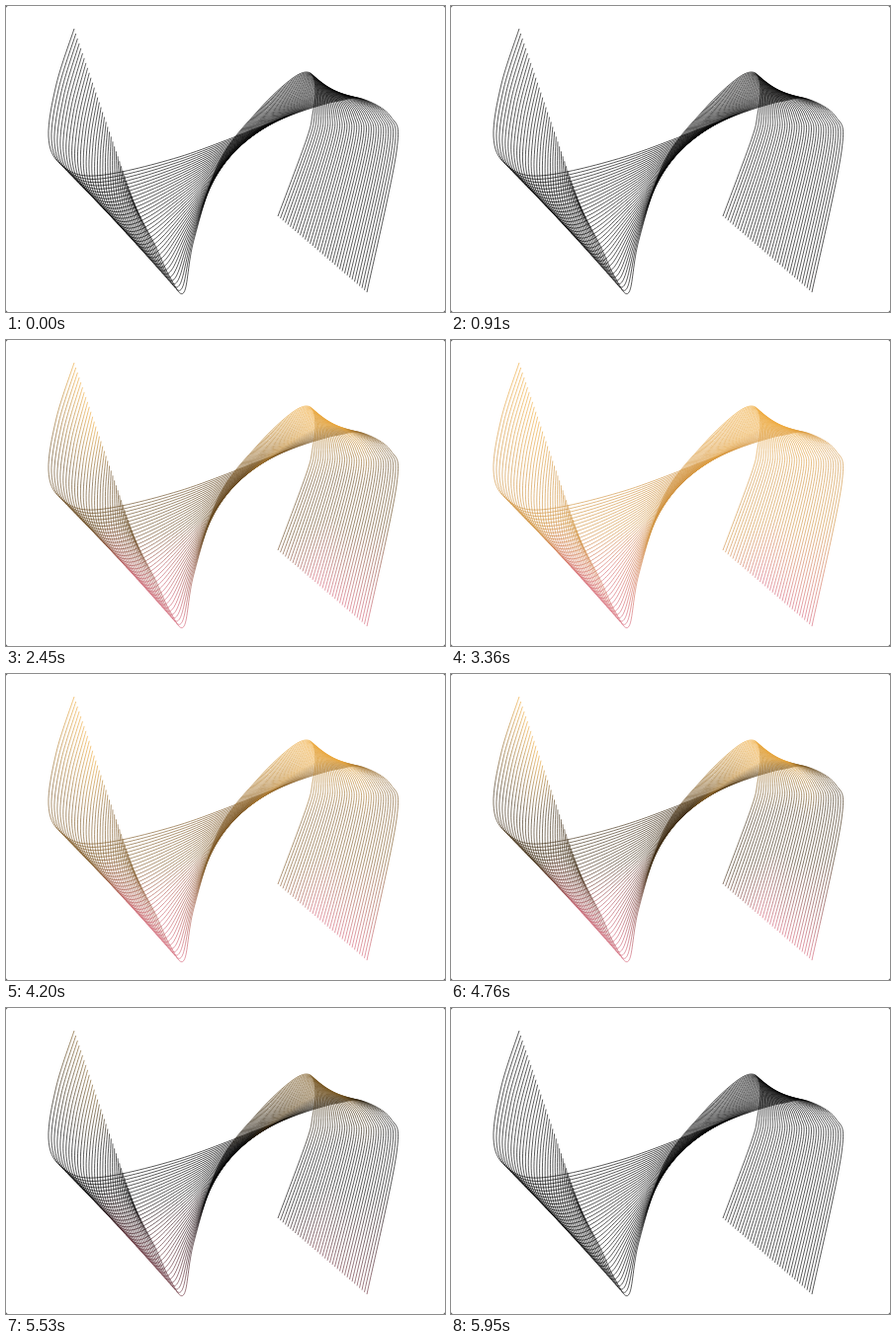
Write an HTML page that moves like this. It is 444 px wide and 310 px high and loops after 6090 ms.

```html
<!DOCTYPE html>
<html lang="en">
<head>
<meta charset="utf-8">
<title>Ribbon</title>
<style>
  html, body { margin: 0; width: 100%; height: 100%; overflow: hidden; background: #222; }
  svg { display: block; width: 444px; height: 310px; background: #fff; border-radius: 2px; }
  #lines { fill: none; stroke: url(#tint); stroke-width: .65px; }
  stop { stop-color: #000; animation: 6090ms infinite; }
  .top { --tone: #efaa3c; animation-name: ends; }
  .low { --tone: #d66478; animation-name: ends; }
  .mid { --tone: #d99a45; animation-name: middle; }

  /* The ends colour first and darken last. */
  @keyframes ends {
    0% { stop-color: #000; }
    14.9% { stop-color: #000; animation-timing-function: ease-out; }
    34.5% { stop-color: var(--tone); }
    78.2% { stop-color: var(--tone); animation-timing-function: ease-in; }
    97.7%, 100% { stop-color: #000; }
  }
  @keyframes middle {
    0% { stop-color: #000; }
    25.3% { stop-color: #000; animation-timing-function: linear; }
    56.3% { stop-color: var(--tone); animation-timing-function: linear; }
    87.4%, 100% { stop-color: #000; }
  }
</style>
</head>
<body>
<svg viewBox="0 0 444 310">
  <defs>
    <linearGradient id="tint" x1="0" y1="0" x2="0" y2="1">
      <stop class="top" offset="0"/>
      <stop class="mid" offset=".35"/>
      <stop class="mid" offset=".6"/>
      <stop class="low" offset="1"/>
    </linearGradient>
  </defs>
  <g id="lines"></g>
</svg>
<script>
  const COUNT = 37;

  // Key points of the first and last line; the others are blends of the two.
  const first = [
    [69, 23], [51, 79], [43, 132], [55, 160], [90, 172], [175, 153], [266, 119],
    [298, 107], [320, 100], [337, 96], [360, 94], [389, 112], [395, 147], [365, 290]
  ];
  const last = [
    [130, 202], [140, 222], [151, 243], [166, 275], [180, 290], [190, 237], [216, 157],
    [255, 106], [290, 73], [308, 68], [313, 86], [310, 110], [304, 135], [275, 213]
  ];

  const mix = (p, q, k) => p.map((v, i) => v + (q[i] - v) * k);

  // Catmull-Rom spline through the points, as Bézier segments.
  function spline(points) {
    const at = i => points[Math.max(0, Math.min(points.length - 1, i))];
    const handle = (i, side) =>
      at(i).map((v, axis) => v + side * (at(i + 1)[axis] - at(i - 1)[axis]) / 6);
    let d = `M${at(0)}`;
    for (let i = 1; i < points.length; i++) {
      d += `C${handle(i - 1, 1)} ${handle(i, -1)} ${at(i)}`;
    }
    return d;
  }

  const group = document.getElementById('lines');
  for (let n = 0; n < COUNT; n++) {
    const k = n / (COUNT - 1);
    const path = document.createElementNS('http://www.w3.org/2000/svg', 'path');
    path.setAttribute('d', spline(first.map((p, i) => mix(p, last[i], k))));
    group.append(path);
  }
</script>
</body>
</html>
```
